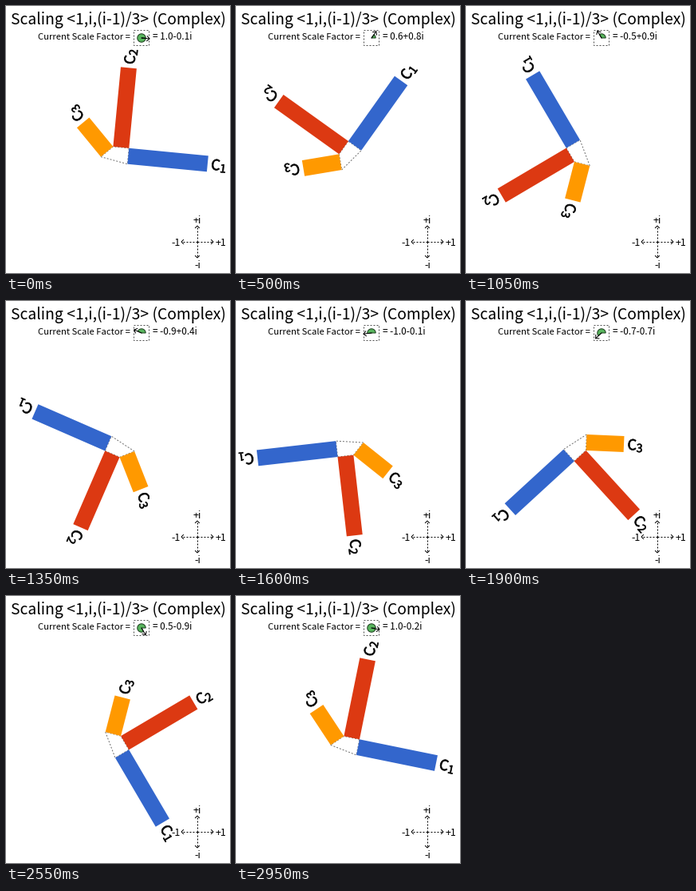
A matplotlib script for the animation above (3000 ms loop, 281 px wide and 334 px high).

```python
import numpy as np
import matplotlib.pyplot as plt
from matplotlib.animation import FuncAnimation
from matplotlib.patches import PathPatch, Polygon, Rectangle, Wedge
from matplotlib.textpath import TextPath
from matplotlib.transforms import Affine2D

W, H, DPI = 281, 334, 64
PX = 72 / DPI  # points per pixel
FRAMES, STEP_MS = 60, 50
START = -5.5  # degrees
FONT = "Noto Sans CJK JP"

HUB = (140, 185)
WIDTH, LENGTH = 20, 100
BARS = [(1, "#3366cc"), (1j, "#dc3912"), ((1j - 1) / 3, "#ff9900")]
DIAL, HAND, HEAD = (170, 40), 10, 3

plt.rcParams["font.family"] = FONT
fig = plt.figure(figsize=(W / DPI, H / DPI), dpi=DPI, facecolor="white")
ax = fig.add_axes([0, 0, 1, 1])
ax.set(xlim=(0, W), ylim=(H, 0))
ax.axis("off")


def label(x, y, s, size, **kw):
    return ax.text(x, y, s, fontsize=size * PX, va="baseline", **kw)


def arrow_points(x, y, angle, length, head):
    """Shaft and open-head polylines for an arrow starting at (x, y)."""
    d = np.exp(-1j * np.radians(angle))
    base = complex(x, y)
    tip = base + length * d
    wings = [tip + head * d * (-1 + 1j), tip, tip + head * d * (-1 - 1j)]
    return np.array([base, tip]), np.array(wings)


def arrow(x, y, angle, length, head, z, dots):
    shaft, wings = arrow_points(x, y, angle, length, head)
    a, = ax.plot(shaft.real, shaft.imag, color="black", lw=PX, zorder=z,
                 ls=dots, dash_capstyle="butt")
    b, = ax.plot(wings.real, wings.imag, color="black", lw=PX, zorder=z,
                 solid_joinstyle="miter")
    return a, b


def xy(points):
    return np.column_stack([np.real(points), np.imag(points)])


# Header
label(6, 23.5, "Scaling <1,i,(i-1)/3> (Complex)", 19.3)
label(40, 42.5, "Current Scale Factor =", 11.3)
value = label(184, 42.5, "", 11.8)
ax.add_patch(Rectangle((160, 30), 19, 19, fc="white", ec="#505050",
                       lw=PX, ls=(0, (2, 2)), capstyle="butt"))
pie = ax.add_patch(Wedge(DIAL, 5.2, 0, 1, fc="#58b55d", ec="#1c3c1e",
                         lw=PX, zorder=3))
hand = arrow(*DIAL, 0, HAND, HEAD, 4, "-")

# Compass
for angle in (0, 90, 180, 270):
    arrow(240, 295, angle, 20, 2.5, 5, (0, (2, 2)))
for x, y, s in [(240, 271.5, "+i"), (240, 327.5, "-i"),
                (213.3, 299.5, "-1"), (269, 299.5, "+1")]:
    label(x, y, s, 12.5, ha="center", zorder=5)

# Bars sit on three sides of a quadrilateral centred on the hub
corners = np.array([0, -WIDTH, -WIDTH + WIDTH * np.exp(1.25j * np.pi),
                    -1j * WIDTH])
corners = corners - corners.mean()
a, b, c, d = corners
turning = [ax.add_patch(Polygon(xy(corners), fc="none", ec="#707070", lw=PX,
                                ls=(0, (2, 2)), capstyle="butt", zorder=1))]
for n, ((scale, color), (p, q)) in enumerate(
        zip(BARS, [(d, a), (a, b), (b, c)]), 1):
    reach = LENGTH * scale
    turning.append(ax.add_patch(Polygon(xy([p, q, q + reach, p + reach]),
                                        fc=color, ec="none", zorder=2)))
    end = (p + q) / 2 + reach
    place = Affine2D().rotate(np.angle(scale)).translate(end.real, end.imag)
    for x, y, s, size in [(4.5, -6.8, "C", 18), (15.9, -9.2, str(n), 14)]:
        glyph = TextPath((x, y), s, size=size, prop={"family": FONT})
        turning.append(ax.add_patch(PathPatch(
            place.transform_path(glyph), fc="black", ec="black",
            lw=0.7 * PX, zorder=4)))


def fixed(v, spec):
    return format(round(v, 1) + 0.0, spec)


def update(i):
    angle = START + i * 360 / FRAMES
    spin = Affine2D().rotate_deg(angle).scale(1, -1).translate(*HUB)
    for patch in turning:
        patch.set_transform(spin + ax.transData)
    z = np.exp(1j * np.radians(angle))
    value.set_text(f"= {fixed(z.real, '.1f')}{fixed(z.imag, '+.1f')}i")
    pie.set_theta1(-(angle % 360))
    pie.set_theta2(0)
    for line, pts in zip(hand, arrow_points(*DIAL, angle, HAND, HEAD)):
        line.set_data(pts.real, pts.imag)
    return [*turning, value, pie, *hand]


anim = FuncAnimation(fig, update, frames=FRAMES, interval=STEP_MS,
                     repeat=True, repeat_delay=0)
plt.show()
```
